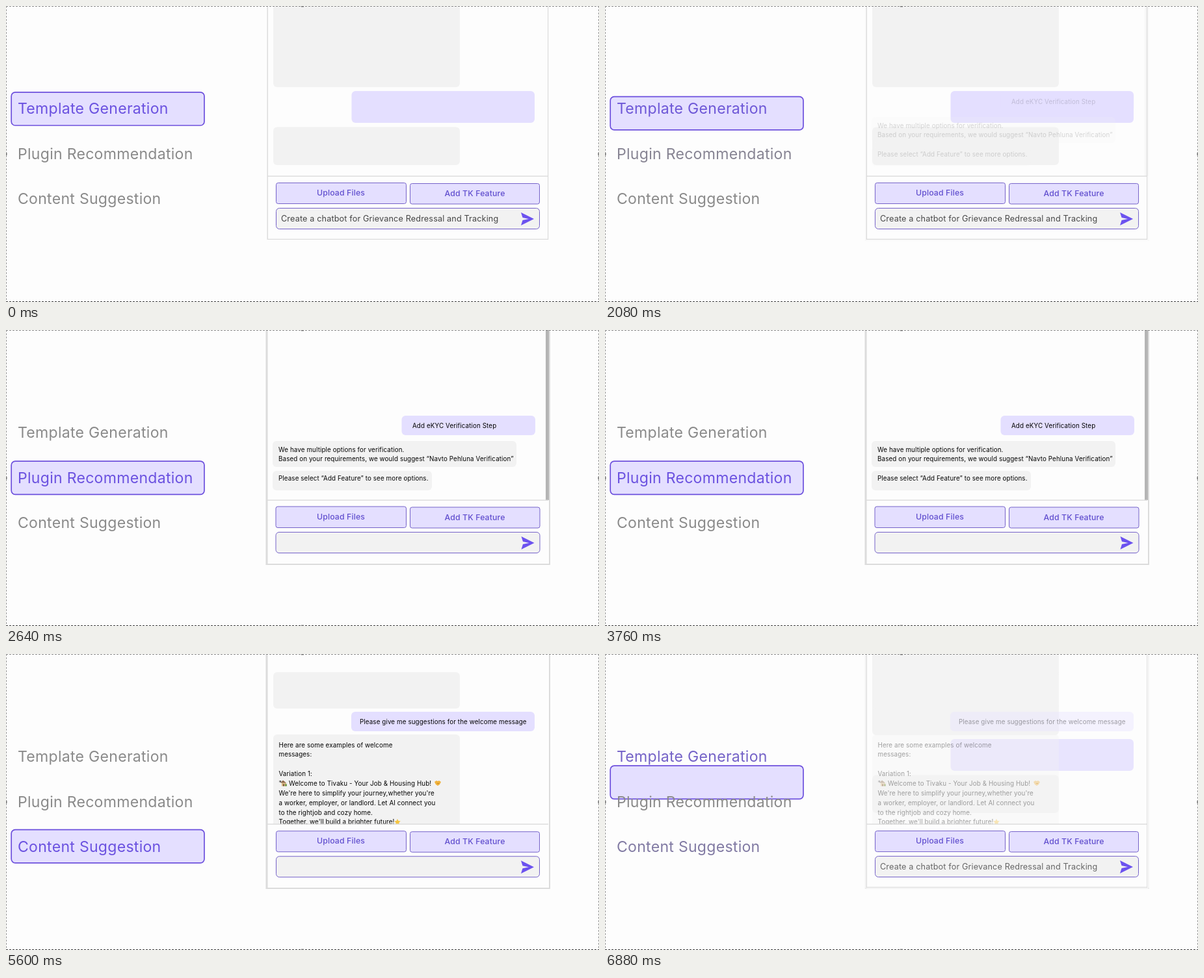
These frames come from a looping animation (912x456 px, 6.96 s). An HTML page with a canvas:

```html
<!DOCTYPE html>
<html lang="en">
<head>
<meta charset="utf-8">
<title>Chat assistant features</title>
<style>
  html, body { margin: 0; width: 100%; height: 100%; overflow: hidden; background: #fdfdfd; }
  canvas { display: block; width: 912px; height: 456px; }
</style>
</head>
<body>
<canvas id="stage" width="912" height="456"></canvas>
<script>
const ctx = document.getElementById('stage').getContext('2d');
const LOOP = 6960, STEP = 80, MOVE = 330;
const STARTS = [1976, 4288, 6601];
const MENU = ['Template Generation', 'Plugin Recommendation', 'Content Suggestion'];
const MENU_BASE = [166, 235.5, 304.5];
const MARK_Y = [132.8, 202.1, 270.6];
const GREY = [138, 138, 138], VIOLET = [107, 82, 224];
const PALE = '#e4dfff', SOFT = '#f2f2f2', EDGE = '#7562c9';

const mix = (a, b, p) => a + (b - a) * p;
const smooth = p => p * p * (3 - 2 * p);
const mixColor = p => `rgb(${GREY.map((g, i) => Math.round(mix(g, VIOLET[i], p)))})`;

// Weight of each of the three states, and the y of the highlight
function pose(t) {
  let from = 0, p = 0;
  STARTS.forEach((s, i) => {
    if (t >= s) {
      from = i;
      p = Math.min(1, (t - s) / MOVE) ** 2;
    }
  });
  const to = (from + 1) % 3;
  const w = [0, 0, 0];
  w[from] = 1 - p;
  w[to] += p;
  return { w, p, from, y: mix(MARK_Y[from], MARK_Y[to], p) };
}

function box(x1, y1, x2, y2, r, fill, stroke, width = 1) {
  ctx.beginPath();
  ctx.roundRect(x1, y1, x2 - x1, y2 - y1, r);
  ctx.fillStyle = fill;
  ctx.fill();
  if (stroke) {
    ctx.strokeStyle = stroke;
    ctx.lineWidth = width;
    ctx.stroke();
  }
}

function bar(x, y, w, h, color) {
  ctx.fillStyle = color;
  ctx.fillRect(x, y, w, h);
}

function label(text, x, y, size, color, weight = 400, align = 'left') {
  ctx.font = `${weight} ${size}px Inter, "Open Sans", sans-serif`;
  ctx.letterSpacing = (size * 0.011).toFixed(3) + 'px';
  ctx.textAlign = align;
  ctx.fillStyle = color;
  ctx.fillText(text, x, y);
}

const chat = (text, x, y) => label(text, x, y, 9.8, '#050505');

function shape(points, color) {
  ctx.beginPath();
  points.forEach(([x, y]) => ctx.lineTo(x, y));
  ctx.closePath();
  ctx.fillStyle = color;
  ctx.fill();
}

function layer(alpha, draw) {
  if (alpha <= 0.002) return;
  ctx.save();
  ctx.globalAlpha = alpha;
  draw();
  ctx.restore();
}

function house(x, y) {
  bar(x + 2, y + 4, 7, 5, '#d9b780');
  shape([[x, y + 4], [x + 4, y], [x + 9, y + 4]], '#8d6748');
  bar(x + 4, y + 6, 2, 3, '#75533c');
  bar(x + 7, y + 6, 3, 3, '#6f9c4c');
}

function hands(x, y) {
  shape([[x, y + 2], [x + 3, y], [x + 5, y + 1], [x + 7, y], [x + 10, y + 2],
    [x + 8, y + 6], [x + 5, y + 8], [x + 2, y + 6]], '#f0b23c');
  bar(x + 4, y + 4, 3, 1, '#c88420');
}

function star(x, y, r) {
  const pts = Array.from({ length: 10 }, (_, i) => {
    const a = i * Math.PI / 5 - Math.PI / 2, d = i % 2 ? r * 0.5 : r;
    return [x + d * Math.cos(a), y + d * Math.sin(a)];
  });
  shape(pts, '#f4c440');
}

function blankChat() {
  box(411, -10, 698, 125, 6, SOFT);
  box(531.5, 131, 813, 180, 6, PALE);
  box(411, 186.5, 698, 245, 6, SOFT);
}

function pluginChat() {
  box(608.5, 132, 814, 162, 6, PALE);
  box(410, 171, 785, 211, 6, SOFT);
  box(410, 217, 655, 247, 6, SOFT);
  chat('Add eKYC Verification Step', 625, 150.5);
  chat('We have multiple options for verification.', 419, 187.5);
  chat('Based on your requirements, we would suggest “Navto Pehluna Verification”', 419, 202.3);
  chat('Please select “Add Feature” to see more options.', 419, 232.3);
}

function contentChat() {
  box(411, 28, 698, 84, 6, SOFT);
  box(531, 89, 813, 119, 6, PALE);
  box(411, 124, 698, 280, 6, SOFT);
  chat('Please give me suggestions for the welcome message', 544, 107.5);
  const lines = ['Here are some examples of welcome', 'messages:', '', 'Variation 1:', '"',
    "We're here to simplify your journey,whether you're",
    'a worker, employer, or landlord. Let AI connect you',
    'to the rightjob and cozy home.',
    "Together, we'll build a brighter future!"];
  lines.forEach((s, i) => chat(s, 419.5, 143.5 + i * 14.87));
  chat('Welcome to Tivaku - Your Job & Housing Hub!', 435, 203);
  house(422, 194.5);
  hands(659, 195);
  star(602, 259, 5);
}

function thinFrame() {
  bar(401.5, 0, 1.5, 360, '#dcdcdc');
  bar(833, 0, 1.2, 360, '#dcdcdc');
  bar(402, 358.7, 432, 1.3, '#dcdcdc');
}

function thickFrame() {
  bar(399.5, 0, 3, 362, '#dcdcdc');
  bar(835, 0, 2, 362, '#dcdcdc');
  bar(400, 360, 437, 2, '#dcdcdc');
}

function controls(b, c, hint) {
  const g = b * 0.5;
  ctx.save();
  ctx.translate(0, c * 0.25);
  box(415.5 - g, 272.5 - g, 615.5, 304.5, 3, PALE, EDGE);
  box(621.5, 273.5 - g, 820.5 + g, 305, 3, PALE, EDGE);
  label('Upload Files', 515, 292, 12.3, '#6250cf', 500, 'center');
  label('Add TK Feature', 721, 292.6, 12.3, '#6250cf', 500, 'center');
  box(415.5 - g, 311.5, 820.5 + g, 343.5, 5, SOFT, EDGE);
  const x = 792 + g;
  shape([[x, 318], [x + 20, 328], [x, 338], [x + 2.5, 330], [x + 12, 328], [x + 2.5, 326]], '#6c52ef');
  ctx.restore();
  layer(hint, () =>
    label('Create a chatbot for Grievance Redressal and Tracking', 423, 332.4, 12.65, '#444'));
}

function stageEdge() {
  ctx.save();
  ctx.setLineDash([3, 2]);
  ctx.lineWidth = 1;
  const edge = (x1, y1, x2, y2, color) => {
    ctx.beginPath();
    ctx.moveTo(x1, y1);
    ctx.lineTo(x2, y2);
    ctx.strokeStyle = color;
    ctx.stroke();
  };
  edge(0, 0.5, 912, 0.5, '#8a8a8a');
  edge(0.5, 0, 0.5, 456, '#9a9a9a');
  edge(911.5, 0, 911.5, 456, '#9a9a9a');
  edge(0, 455.5, 912, 455.5, '#3c3c3c');
  ctx.restore();
  bar(454, 0, 4, 1.5, '#777');
  bar(454, 454.5, 4, 1.5, '#777');
  bar(0, 226, 1.5, 4, '#777');
  bar(910.5, 226, 1.5, 4, '#777');
}

function draw(t) {
  const { w, p, from, y } = pose(t);
  const [a, b, c] = w;
  // The blank chat shows through faintly while the second state gives way to the third
  const ghost = from === 1 ? p * (1 - p) * 0.55 : 0;
  const blank = Math.max(smooth(a), ghost);

  bar(0, 0, 912, 456, '#fdfdfd');

  box(8.2, y, 305, y + 51.2, 6, PALE, '#6d50dd', 1.7);
  MENU.forEach((s, i) => label(s, 18, MENU_BASE[i], 23.1, mixColor(w[i])));

  ctx.save();
  ctx.beginPath();
  ctx.rect(399, 0, 440, 262);
  ctx.clip();
  layer(blank, blankChat);
  layer(c ** 0.8, contentChat);
  layer(b ** 0.8, pluginChat);
  layer(b, () => bar(830, 0, 5.5, 262, '#b5b5b5'));
  ctx.restore();

  layer(smooth(a), thinFrame);
  layer(1 - a, thickFrame);
  bar(402, 261.5, 432, 1.3, '#dadada');
  controls(b, c, blank);
  stageEdge();
}

function tick() {
  const t = performance.now() % LOOP;
  draw(Math.floor(t / STEP) * STEP);
  requestAnimationFrame(tick);
}
tick();
</script>
</body>
</html>
```
